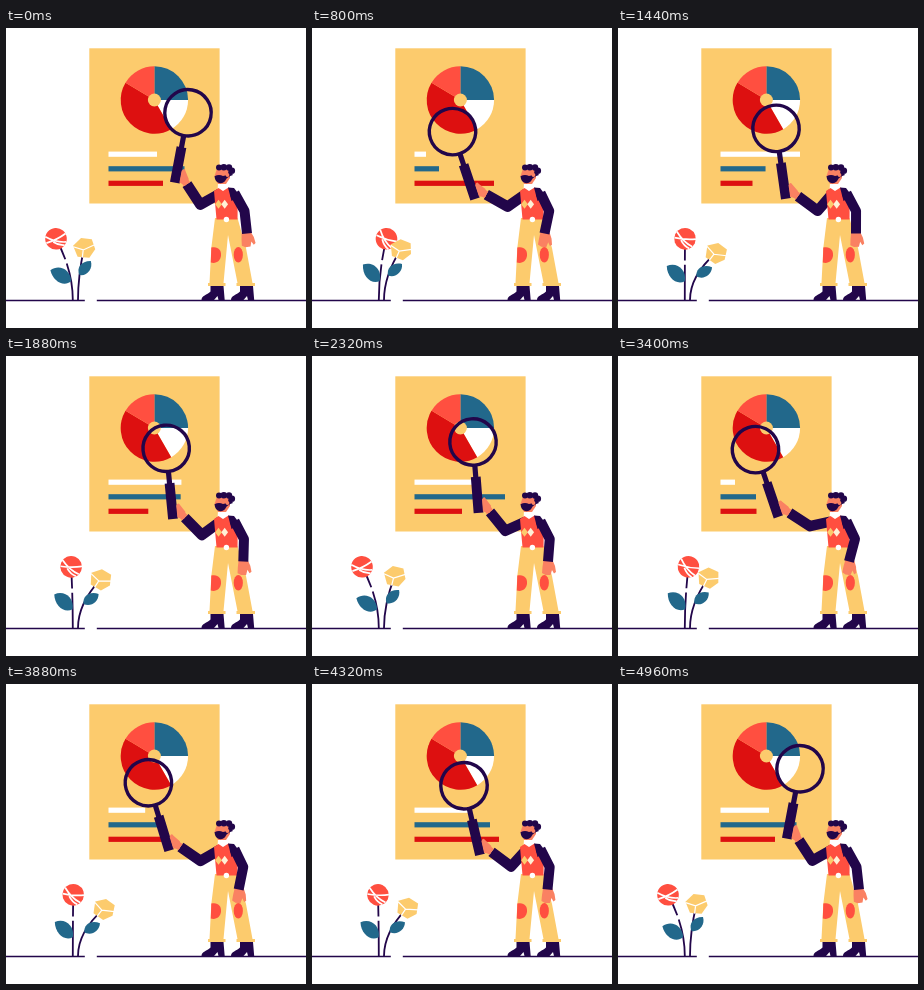
An HTML page for the animation above (5000 ms loop, 300 px wide and 300 px high).

```html
<!DOCTYPE html>
<html lang="en">
<head>
<meta charset="utf-8">
<title>Report inspection</title>
<style>
  html, body { margin: 0; width: 100%; height: 100%; overflow: hidden; background: #fff; }
  svg { display: block; width: 100vw; height: 100vh; }
  .navy { fill: #22064a; }
  .yellow { fill: #fccb6d; }
  .coral { fill: #ff4f40; }
  .red { fill: #dd1010; }
  .blue { fill: #22688b; }
  .white { fill: #fff; }
  .skin { fill: #fa8162; }
  .line { fill: none; stroke: #22064a; stroke-linejoin: round; }
  .band { fill: none; stroke: #fff; stroke-width: 1.7; }
</style>
</head>
<body>
<svg viewBox="0 0 300 300">
  <rect class="yellow" x="83.300" y="20.300" width="130.300" height="155.200"/>
  <g id="pie"></g>
  <circle class="yellow" cx="148.400" cy="72" r="6.500"/>
  <rect class="white bar" x="102.500" y="123.600" height="5.200"/>
  <rect class="blue bar" x="102.500" y="138.200" height="5.200"/>
  <rect class="red bar" x="102.500" y="152.700" height="5.200"/>

  <path class="line" stroke-width="1.500" d="M0 272.400H78.800M90.800 272.400H300"/>

  <!-- flowers -->
  <path id="stemA" class="line" stroke-width="1.800" pathLength="100" stroke-dasharray="58 7 100"/>
  <path id="stemB" class="line" stroke-width="1.800"/>
  <path id="leafA" class="blue" d="M0 0C3 -9 15 -10 23.500 -2C20 8 7 10 0 0Z"/>
  <path id="leafB" class="blue" d="M0 0C3 -7.500 12 -8 18 -1C14 6 4 6.500 0 0Z"/>
  <g id="headA">
    <circle class="coral" r="10.800"/>
    <path class="band" d="M-10.500 -3Q0 4 10 4M-10 3.500Q1 1 10 -4.500M-3 3Q2 7 8 7"/>
  </g>
  <g id="headB">
    <path class="yellow" d="M-10.500 -4L-1.500 -10.500L9 -8L11 2.500L4 10L-7.500 7.500Z"/>
    <path class="band" style="stroke-width:1.200" d="M-10.500 -3L-1 1.500L11 -2M-1 1.500L-3 9"/>
  </g>

  <!-- magnifier and holding arm -->
  <path id="armA" class="line" stroke-width="10.500"/>
  <path id="wrist" fill="none" stroke="#fa8162" stroke-width="7.500"/>
  <g id="glass">
    <path class="navy" d="M-2.600 23H2.600V35H4.900V71H-4.900V35H-2.600Z"/>
    <circle class="line" r="23.200" stroke-width="3.400"/>
    <path class="skin" d="M4.500 58Q7 54 8.500 58L13 65L11 72L4.500 70Z"/>
  </g>

  <!-- legs -->
  <path class="yellow" d="M209 190H231.500L240 220L246.500 255H249V258H230.500V255H231.500L222 207L217.500 255H219.500V258H202V255H203.500L205.300 220Z"/>
  <path class="coral" d="M205.300 219.500C212 218 215.500 222 215 227.500C214.500 233 210 236 204.800 234.500Z"/>
  <ellipse class="coral" cx="232.300" cy="226.800" rx="4.600" ry="7.700"/>
  <g class="navy">
    <path id="boot" d="M204.500 258H217.500L218.700 272H212.500L211.500 268L208 272H195.500C195.500 267.500 201 267 204.500 263.500Z"/>
    <use href="#boot" x="29.500"/>
  </g>

  <!-- body -->
  <path class="white" d="M212 154H222.500L223 164H211.500Z"/>
  <path class="coral" d="M208 163L212.500 160L217 163L222.500 159.500L228 162C231.500 172 232 181 231.500 191.500H210.500Z"/>
  <path fill="#fccb6d" d="M212.500 171.800l3.400 4.500l-3.400 4.500l-3.400 -4.500Z"/>
  <path fill="#fff0d6" d="M218.700 171.800l3.400 4.500l-3.400 4.500l-3.400 -4.500Z"/>
  <circle class="white" cx="220.400" cy="191.500" r="2.700"/>

  <!-- head -->
  <path class="skin" d="M210.500 142H224V150L220 156H212L208.500 148Z"/>
  <g class="navy">
    <path d="M208.500 148.200Q213 145.800 217 148L221.500 147L223 142L227 147Q221 149 220 151.500Q218 155.500 214 155.300Q209 154.500 208.500 148.200Z"/>
    <circle cx="213" cy="139.500" r="3"/>
    <circle cx="217.800" cy="139.300" r="3.300"/>
    <circle cx="223" cy="139.500" r="3.200"/>
    <circle cx="225.800" cy="142.800" r="3.300"/>
  </g>
  <circle class="skin" cx="221.500" cy="147" r="1.900"/>

  <!-- resting arm -->
  <path id="palm" class="skin" d="M-4.500 -7H4.500L7 -1L8 5L6 6.500L4 3L2.500 8H-2.500L-6 6L-5.500 0Z"/>
  <path class="navy" d="M222 159.500L228 160L234 168L225.500 173Z"/>
  <path id="armB" class="line" stroke-width="10"/>
</svg>
<script>
  const LOOP = 5000;
  const SWAY = 2500;
  const $ = id => document.getElementById(id);
  const set = (el, name, value) => el.setAttribute(name, value);
  const rad = deg => deg * Math.PI / 180;

  // Smooth cyclic track that does not overshoot its keys.
  function track(times, values, period) {
    const n = times.length;
    const at = i => times[(i + n) % n] + period * Math.floor(i / n);
    const val = i => values[(i + n) % n];
    const slope = i => (val(i + 1) - val(i)) / (at(i + 1) - at(i));
    const tangent = i => {
      const a = slope(i - 1), b = slope(i);
      return a * b <= 0 ? 0 : 2 * a * b / (a + b);
    };
    return time => {
      const t = time % period;
      let i = n - 1;
      while (i > 0 && times[i] > t) i--;
      const h = at(i + 1) - at(i), u = (t - at(i)) / h;
      const u2 = u * u, u3 = u2 * u;
      return val(i) * (2 * u3 - 3 * u2 + 1) + val(i + 1) * (3 * u2 - 2 * u3)
        + h * (tangent(i) * (u3 - 2 * u2 + u) + tangent((i + 1) % n) * (u3 - u2));
    };
  }

  const times = [0, 800, 1440, 2320, 3400, 4320, 4960];
  const main = (...v) => track(times, [...v, v[0]], LOOP);
  const glassX = main(182, 140.5, 158, 161, 137.5, 152);
  const glassY = main(84.8, 103.6, 100.4, 86, 93.6, 101.7);
  const tilt = main(10.7, -18.5, -8, -4.5, -18.8, -13);
  const palmX = main(241, 232.5, 238, 236, 231, 235.5);
  const bars = [
    main(48.5, 11.5, 79.5, 60, 14.5, 56),
    main(76, 24.5, 45, 90.5, 35.5, 75.5),
    main(54.5, 79.5, 32, 47.5, 36, 84.5)
  ];
  const swayTimes = [0, 800, 900, 1440, 1820, 2320];
  const sway = (...v) => track(swayTimes, v, SWAY);
  const redX = sway(50, 74.5, 70.5, 67, 66, 50);
  const goldX = sway(78, 88.5, 90, 97.5, 95, 82.5);

  const barEls = document.querySelectorAll('.bar');

  // Pie wedges: start angle, end angle, colour class.
  const polar = deg => `${148.4 + 33.7 * Math.cos(rad(deg))} ${72 + 33.7 * Math.sin(rad(deg))}`;
  $('pie').innerHTML = [
    [-90, 0, 'blue'], [0, 60, 'white'], [60, 211, 'red'], [211, 270, 'coral']
  ].map(([a, b, c]) =>
    `<path class="${c}" d="M148.4 72L${polar(a)}A33.7 33.7 0 0 1 ${polar(b)}Z"/>`
  ).join('');

  function place(el, x, y, deg) {
    set(el, 'transform', `translate(${x} ${y}) rotate(${deg})`);
  }

  function flower(head, stem, leaf, f) {
    set(stem, 'd', `M${f.base} 272Q${f.base} ${f.bend} ${f.x} ${f.y}`);
    place(head, f.x, f.y, f.turn);
    // Attach the leaf part-way up the stem.
    const u = f.joint, v = 1 - u;
    const x = v * v * f.base + 2 * u * v * f.base + u * u * f.x;
    const y = v * v * 272 + 2 * u * v * f.bend + u * u * f.y;
    place(leaf, x, y, f.leaf);
  }

  // Elbow of a two-bone arm, bent downwards.
  function elbow(sx, sy, hx, hy, upper, fore) {
    const dx = hx - sx, dy = hy - sy;
    const d = Math.min(Math.hypot(dx, dy), upper + fore - 0.1);
    const bend = Math.acos((upper * upper + d * d - fore * fore) / (2 * upper * d));
    const a = Math.atan2(dy, dx) - bend;
    return [sx + upper * Math.cos(a), sy + upper * Math.sin(a)];
  }

  function draw(t) {
    barEls.forEach((el, i) => set(el, 'width', bars[i](t)));

    const rx = redX(t), gx = goldX(t);
    flower($('headA'), $('stemA'), $('leafA'), {
      base: 66.8, bend: 242, x: rx, y: 210.8, joint: 0.31,
      turn: (rx - 50) * 1.8 - 5, leaf: 213 + (rx - 50) * 0.7
    });
    flower($('headB'), $('stemB'), $('leafB'), {
      base: 72, bend: 248, x: gx, y: 220.3 + (gx - 78) * (gx - 78) * 0.013, joint: 0.5,
      turn: (gx - 78) * 1.6 - 8, leaf: -48 + (gx - 78) * 1.1
    });

    const x = glassX(t), y = glassY(t), deg = tilt(t);
    place($('glass'), x, y, deg);
    const c = Math.cos(rad(deg)), s = Math.sin(rad(deg));
    const hx = x + 8 * c - 66 * s, hy = y + 8 * s + 66 * c;
    const [ex, ey] = elbow(213, 166, hx, hy, 21.5, 30.5);
    const wx = hx + (ex - hx) * 0.2, wy = hy + (ey - hy) * 0.2;
    set($('armA'), 'd', `M215 165L${ex} ${ey}L${wx} ${wy}`);
    set($('wrist'), 'd', `M${hx} ${hy}L${wx} ${wy}`);

    const px = palmX(t);
    const ax = 237.6 + (px - 235) * 0.15;
    set($('armB'), 'd', `M228.5 165L${ax} 183L${px} 205.5`);
    place($('palm'), px, 211, (236 - px) * 1.5);
  }

  function tick() {
    draw(performance.now() % LOOP);
    requestAnimationFrame(tick);
  }
  tick();
</script>
</body>
</html>
```
